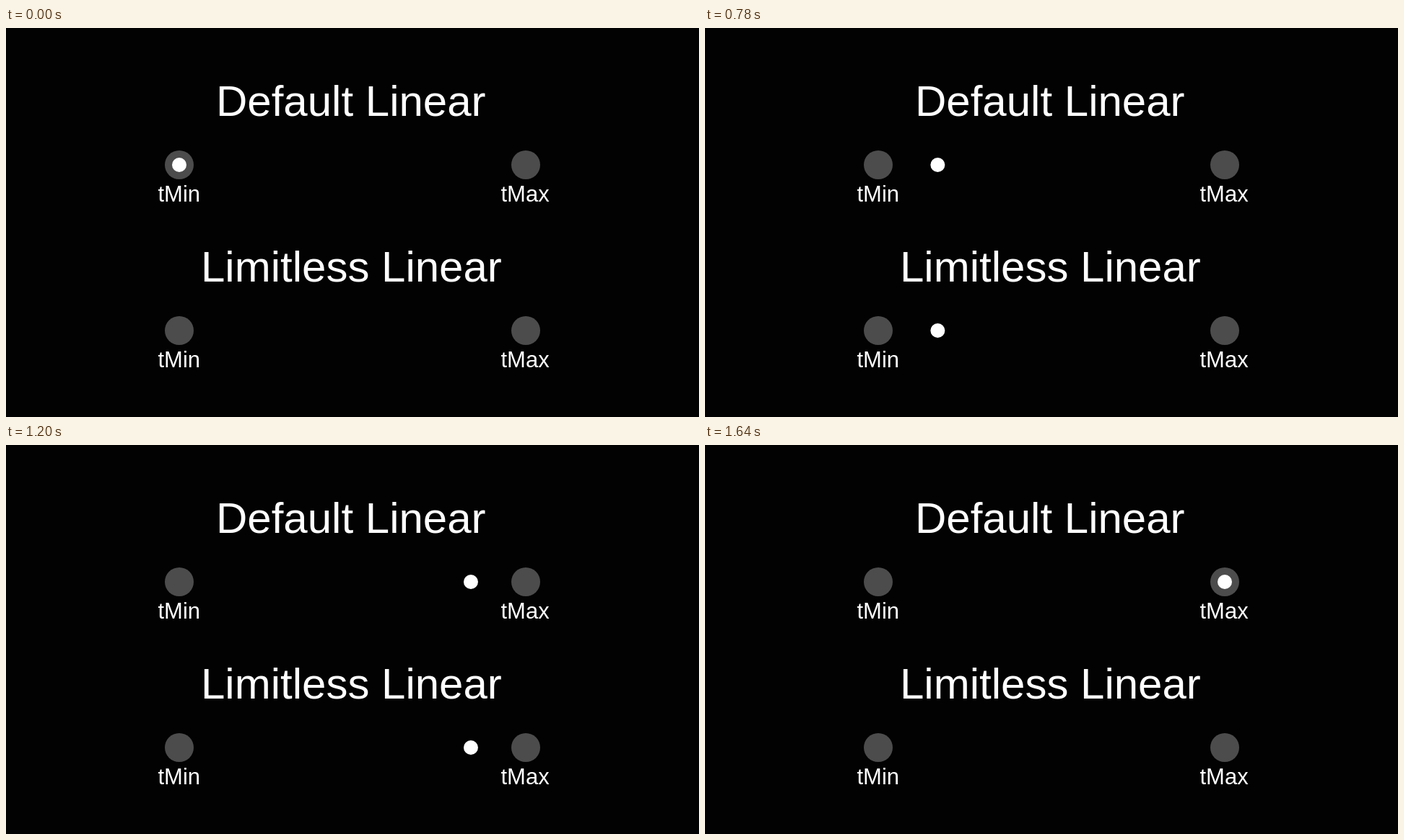
An HTML page with a canvas that plays this animation: 960x540 px, repeating every 2 s.

```html
<!DOCTYPE html>
<html lang="en">
<head>
<meta charset="utf-8">
<title>Linear interpolation</title>
<style>
  html, body { margin: 0; width: 100%; height: 100%; overflow: hidden; background: #020202; }
  canvas { display: block; width: 960px; height: 540px; }
</style>
</head>
<body>
<canvas id="stage" width="960" height="540"></canvas>
<script>
const ctx = document.getElementById('stage').getContext('2d');
const LOOP = 2000, STEP = 20;
const X_MIN = 240, X_MAX = 720;
const clamp = (v, lo, hi) => Math.min(hi, Math.max(lo, v));

function disc(x, y, radius, color) {
  ctx.fillStyle = color;
  ctx.beginPath();
  ctx.arc(x, y, radius, 0, Math.PI * 2);
  ctx.fill();
}

function label(text, x, y, size) {
  ctx.font = `${size}px "Liberation Sans", Arial, sans-serif`;
  ctx.fillStyle = '#fff';
  ctx.fillText(text, x, y);
}

// Constant speed, simulated at 120 ticks per second and shown every 20 ms.
function ballX(ms) {
  const shown = Math.floor(ms / STEP) * STEP;
  const tick = Math.ceil((shown - 540) * 3 / 25);
  return 480 + (tick - 54) * 6.306;
}

function drawRow(title, titleX, y, x) {
  label(title, titleX, y - 68.5, 60);
  disc(X_MIN, y, 20, '#4c4c4c');
  disc(X_MAX, y, 20, '#4c4c4c');
  label('tMin', 210.5, y + 51, 31);
  label('tMax', 685.5, y + 51, 31);
  disc(x, y, 10, '#fff');
}

const start = performance.now();

function frame() {
  const x = ballX((performance.now() - start) % LOOP);
  ctx.fillStyle = '#020202';
  ctx.fillRect(0, 0, 960, 540);
  drawRow('Default Linear', 291, 190, clamp(x, X_MIN, X_MAX));
  drawRow('Limitless Linear', 270, 420, x);
  requestAnimationFrame(frame);
}
frame();
</script>
</body>
</html>
```
